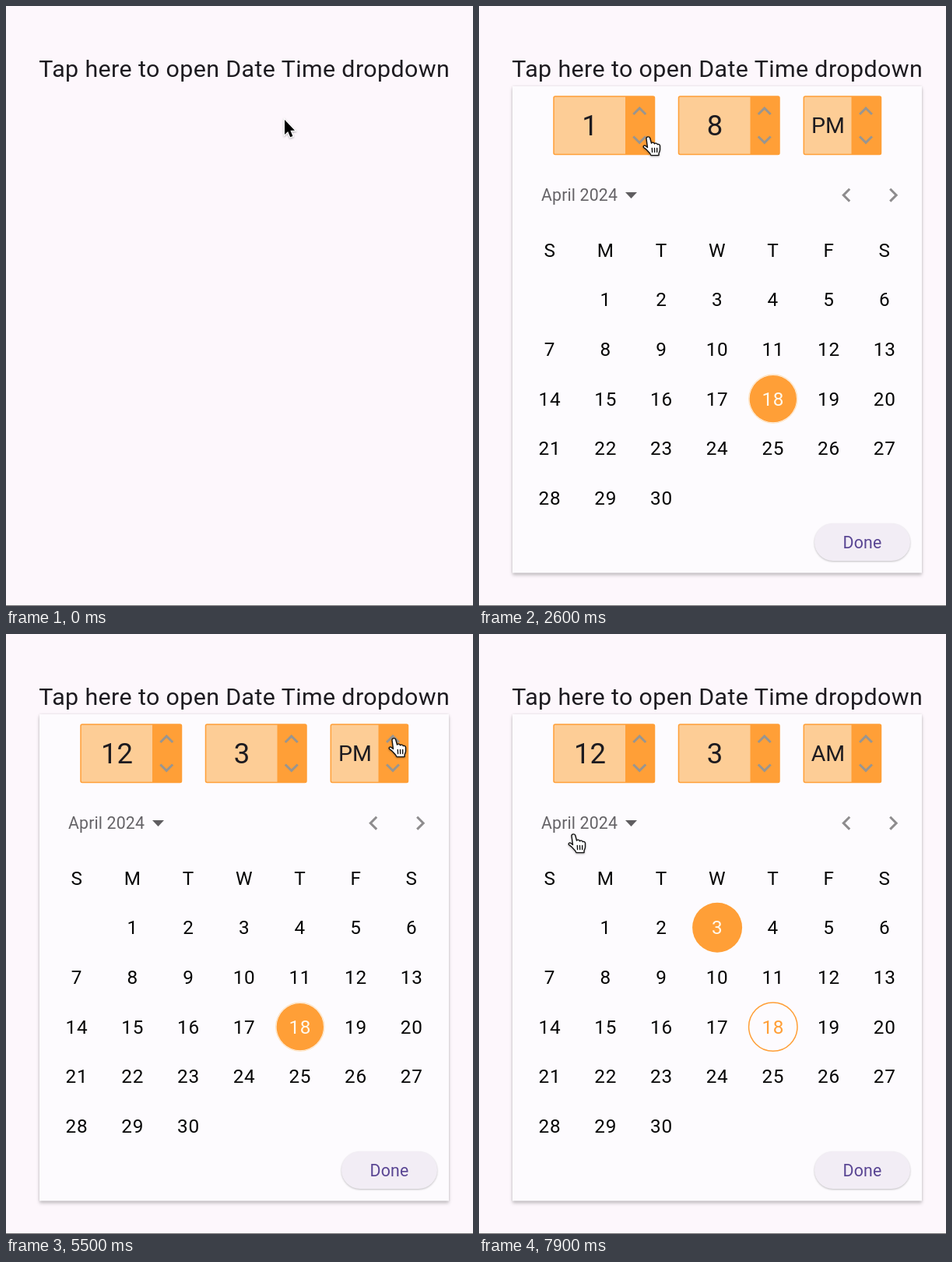
Recreate the animation shown at these times as an HTML page. Size 600 by 770 pixels, loop 8000 ms.

```html
<!DOCTYPE html>
<html lang="en">
<head>
<meta charset="utf-8">
<title>Date time dropdown</title>
<style>
  html, body { margin: 0; width: 100%; height: 100%; overflow: hidden; background: #fdf7fc; }
  svg { display: block; width: 600px; height: 770px; }
  text { font-family: Roboto, Arial, sans-serif; text-anchor: middle; fill: #1d1b20; }
  .big { font-size: 36.5px; }
  .half { font-size: 28.5px; }
  .day { font-size: 24.3px; letter-spacing: .76px; fill: #050505; }
  .small { font-size: 21.3px; letter-spacing: .15px; }
  #panel { filter: drop-shadow(0 3px 2px rgba(0,0,0,.2)) drop-shadow(0 0 1.5px rgba(0,0,0,.12)); }
  #done { filter: drop-shadow(0 1.5px 1.2px rgba(0,0,0,.24)); }
  #cursor { filter: drop-shadow(0 1.5px 1.2px rgba(0,0,0,.3)); }
</style>
</head>
<body>
<svg id="stage" viewBox="0 0 600 770"></svg>
<script>
const ORANGE = '#ff9f37';
const LOOP = 8000, TICK = 100;
const colX = c => 91 + c * 71.7;
const rowY = r => 313 + r * 63.7;
const dayPos = d => [colX(d % 7), rowY(1 + Math.floor(d / 7))];

const text = (x, y, str, cls, extra = '') =>
  `<text x="${x}" y="${y}" class="${cls}" ${extra}>${str}</text>`;

const chevron = (x, y, turn, fill) =>
  `<path transform="translate(${x} ${y}) rotate(${turn}) scale(1.5)" fill="${fill}"
    d="M-4.59 3.7 0-.88 4.59 3.7 6 2.3 0-3.7-6 2.3Z"/>`;

const fields = [
  { id: 'hour', x: 96, split: 188, end: 225.5, cls: 'big' },
  { id: 'minute', x: 256.5, split: 348.5, end: 386, cls: 'big' },
  { id: 'half', x: 417.3, split: 478.5, end: 516.5, cls: 'half' }
];

const field = ({ id, x, split, end, cls }) => {
  const mid = (split + end) / 2 - .5;
  return `<rect x="${x}" y="116" width="${end - x}" height="74.5" rx="2" fill="#fdcd96"/>
    <rect x="${split}" y="116" width="${end - split}" height="74.5" fill="${ORANGE}"/>
    <rect x="${x}" y="116" width="${end - x}" height="74.5" rx="2" fill="none"
      stroke="${ORANGE}" stroke-width="1.5"/>
    ${text((x + split) / 2 + .5, cls === 'big' ? 165.5 : 162.5, '', cls, `id="${id}"`)}
    ${chevron(mid, 134.5, 0, '#999590')}${chevron(mid, 172, 180, '#999590')}`;
};

const circle = (d, r, style) => {
  const [x, y] = dayPos(d);
  return `<circle cx="${x}" cy="${y}" r="${r}" ${style}/>`;
};

const days = Array.from({ length: 30 }, (_, i) => {
  const [x, y] = dayPos(i + 1);
  return text(x, y + 8.6, i + 1, 'day', `id="day${i + 1}"`);
}).join('');

const weekdays = [...'SMTWTFS'].map((s, c) => text(colX(c), 321.8, s, 'day')).join('');

stage.innerHTML = `
  <rect width="600" height="770" fill="#fdf7fc"/>
  <rect y="769" width="600" height="1" fill="#777377"/>
  <g id="popup">
    <rect id="panel" x="43" y="103" width="526" height="624.5" fill="#fdfbfe"/>
    ${fields.map(field).join('')}
    ${text(80, 250.3, 'April 2024', 'small', 'style="text-anchor:start;fill:#656367"')}
    <path d="M188 239h15l-7.5 8Z" fill="#5f5d60"/>
    ${chevron(471.7, 242.7, -90, '#8e8c8e')}${chevron(532.7, 242.7, 90, '#8e8c8e')}
    ${weekdays}
    <g id="before">
      ${circle(18, 31.2, 'fill="none" stroke="#ffdfb5" stroke-width="1"')}
      ${circle(18, 30.2, `fill="${ORANGE}"`)}
    </g>
    <g id="after">
      ${circle(3, 32, `fill="${ORANGE}"`)}
      ${circle(18, 31.2, `fill="none" stroke="${ORANGE}" stroke-width="1.5"`)}
    </g>
    ${days}
    <rect id="done" x="431" y="664" width="123" height="48" rx="24" fill="#f2edf5"/>
    ${text(492.5, 696, 'Done', 'small', 'style="fill:#594593"')}
  </g>
  ${text(306.2, 91, 'Tap here to open Date Time dropdown', '', 'font-size="30.4" letter-spacing=".38"')}
  <g id="cursor">
    <path id="arrow" d="M0 1V20L4.2 16 7.2 23.3 10.4 22 7.4 14.7H13Z"
      stroke="#fff" stroke-width="2.4" paint-order="stroke"/>
    <g id="hand" stroke="#111" stroke-width="1.4" stroke-linejoin="round" stroke-linecap="round">
      <path fill="#fff" d="M-2 2C-2-.5 2-1 2.7 1.5L4.5 8c1-1.5 3.5-1 4 .8 1-1.2 3.2-.8 3.8.9
        1.2-.8 3 0 3.2 1.6v5c0 2-1 3-1.5 5v2.3H4c-1-3-4-5-6-7.5L-5.5 13.5c-1-2 1-3.2 2.5-2l2.5 2Z"/>
      <path fill="none" d="M5.3 14.5l.3 5M8.5 14.5l.2 5M11.7 14.5v5"/>
    </g>
  </g>`;

const $ = id => document.getElementById(id);
const show = (id, on) => $(id).setAttribute('visibility', on ? 'visible' : 'hidden');

// Pointer stops: time, x, y
const stops = [
  [0, 358, 145], [200, 358, 145], [500, 297, 86], [800, 297, 86],
  [1500, 217, 168], [3000, 217, 168], [3400, 215, 110], [3500, 215, 110],
  [3900, 377, 168], [4900, 377, 168], [5200, 545, 152], [5500, 498, 134],
  [6100, 498, 134], [7000, 296, 378], [7300, 296, 378], [7800, 121, 257], [LOOP, 121, 257]
];

// Clicks that lower or flip each field
const hourClicks = [1900, 2100, 2400, 2600, 2900];
const minuteClicks = [4100, 4300, 4500, 4700, 4900];
const OPEN = 800, FLIP = 5900, PICK = 7300;
const count = (clicks, t) => clicks.filter(c => t >= c).length;

function pointer(t) {
  const i = stops.findIndex(s => s[0] > t);
  const [t0, x0, y0] = stops[i - 1], [t1, x1, y1] = stops[i];
  const u = (t - t0) / (t1 - t0), e = u * u * (3 - 2 * u);
  return [x0 + (x1 - x0) * e, y0 + (y1 - y0) * e];
}

const clickable = (x, y) =>
  fields.some(f => x > f.split && x < f.end && y > 115 && y < 190) ||
  (y > 345 && y < 663 && x > 55 && x < 557) ||
  (y > 220 && y < 268 && x > 60 && x < 215);

function draw(t) {
  const open = t >= OPEN, picked = t >= PICK;
  $('popup').style.display = open ? '' : 'none';
  $('hour').textContent = (5 - count(hourClicks, t)) || 12;
  $('minute').textContent = 8 - count(minuteClicks, t);
  $('half').textContent = t >= FLIP ? 'AM' : 'PM';
  $('before').style.display = picked ? 'none' : '';
  $('after').style.display = picked ? '' : 'none';
  $('day3').style.fill = picked ? '#fff8ec' : '';
  $('day18').style.fill = picked ? ORANGE : '#fff8ec';

  const [x, y] = pointer(t), hand = open && clickable(x, y);
  $('cursor').setAttribute('transform', `translate(${x} ${y})`);
  show('hand', hand);
  show('arrow', !hand);
}

const start = performance.now();
function loop() {
  const t = (performance.now() - start) % LOOP;
  draw(Math.floor(t / TICK) * TICK);
  requestAnimationFrame(loop);
}
loop();
</script>
</body>
</html>
```
